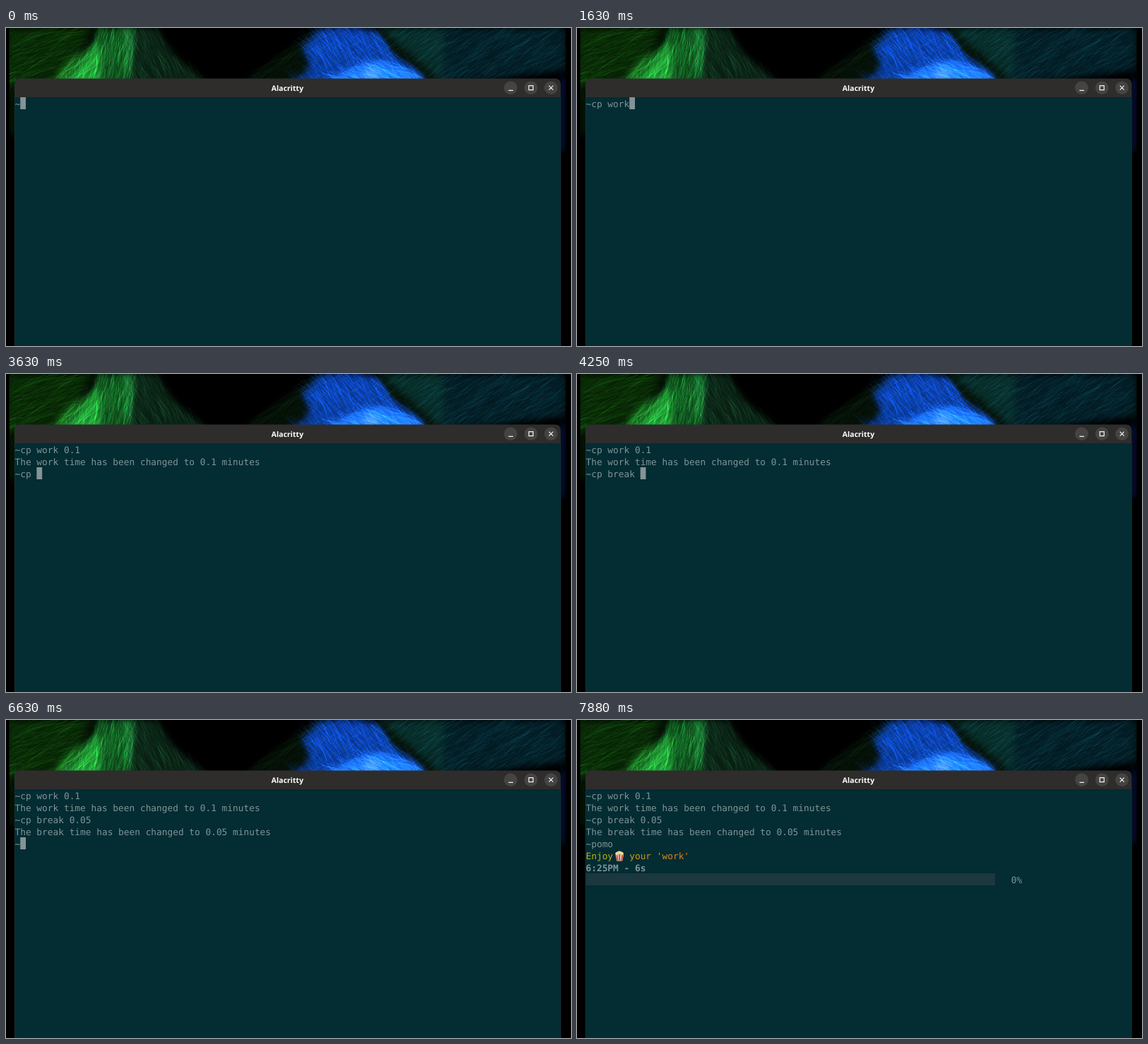
An HTML page with a canvas for the animation above (8 s loop, 800 by 450 pixels).

```html
<!DOCTYPE html>
<html lang="en">
<head>
<meta charset="utf-8">
<title>Terminal</title>
<style>
  html, body { margin: 0; width: 100%; height: 100%; overflow: hidden; background: #000; }
  canvas, svg { position: absolute; left: 0; top: 0; }
  text { white-space: pre; text-rendering: geometricPrecision; }
  .mono { font: 12.82px "DejaVu Sans Mono", monospace; fill: #7f9496; }
  .bold { font-weight: bold; }
  .title { font: bold 10.5px "Open Sans", sans-serif; fill: #fff; text-anchor: middle; }
  .icon { fill: none; stroke: #f4f4f4; stroke-width: 1.2; }
</style>
</head>
<body>
<canvas id="wallpaper" width="800" height="450"></canvas>
<svg width="800" height="450" viewBox="0 0 800 450">
  <defs>
    <linearGradient id="warm" gradientUnits="userSpaceOnUse" x1="12" x2="160" y1="0" y2="0">
      <stop offset="0" stop-color="#b3b80c"/>
      <stop offset="1" stop-color="#dc7a1c"/>
    </linearGradient>
  </defs>
  <path d="M12 98V80q0-8.500 8.500-8.500H777q8.500 0 8.500 8.500V98z" fill="#2e2d2c"/>
  <path d="M12 98H785.500V450H12z" fill="#032c33"/>
  <path d="M12.200 98V450M785.300 98V450" stroke="#28373a" stroke-width=".6"/>
  <text class="title" x="398.500" y="89">Alacritty</text>
  <g fill="#454443">
    <circle cx="714.500" cy="84.700" r="9.400"/>
    <circle cx="743.300" cy="84.700" r="9.400"/>
    <circle cx="771.700" cy="84.700" r="9.400"/>
  </g>
  <path class="icon" d="M711.500 88.300h6.500M740.300 81.700h6v6h-6zM768.700 81.700l6 6m0-6l-6 6"/>

  <g id="screen"></g>
  <rect id="cursor" width="7.800" height="17" fill="#839496"/>

  <g id="session" class="mono">
    <text x="12.500" y="196.500" fill="url(#warm)">Enjoy   your 'work'</text>
    <path d="M54.500 190.500h11.500l-1.800 9h-7.900z" fill="#e9c9b8"/>
    <path d="M56.500 191l1 8M60.200 191v8M64.200 191l-1 8" stroke="#d8402f" stroke-width="1.800"/>
    <path d="M56.500 189l3.500-1.500 3.700 1.500" fill="none" stroke="#f0d79a" stroke-width="4.500" stroke-linecap="round" stroke-linejoin="round"/>
    <text class="bold" x="12.500" y="213.500">6:25PM - 6s</text>
    <rect x="12.500" y="217" width="579.500" height="17" fill="#1b383e"/>
    <text x="614.700" y="230.500">0%</text>
  </g>
</svg>
<script>
const LOOP = 8000, KEY = 125, OUTPUT_AT = 7875;
const LEFT = 12.5, TOP = 98, CELL = 7.718, ROW = 17;
const $ = id => document.getElementById(id);

const reply = (name, minutes) => `The ${name} time has been changed to ${minutes} minutes\n~`;

// Each burst types its text from `at`, one character every `pace` ms (0: all at once).
const bursts = [
  { at: 0, text: '~', pace: 0 },
  { at: 875, text: 'cp work ' },
  { at: 2125, text: '0.1\n' },
  { at: 2625, text: reply('work', 0.1), pace: 0 },
  { at: 3375, text: 'cp ' },
  { at: 3875, text: 'break ', pace: 75 },
  { at: 5000, text: '0.05' },
  { at: 5625, text: '\n' },
  { at: 5750, text: reply('break', 0.05), pace: 0 },
  { at: 7000, text: 'p' },
  { at: 7250, text: 'omo\n' }
];

function typed({ at, text, pace = KEY }, t) {
  if (t < at) return '';
  return pace ? text.slice(0, Math.floor((t - at) / pace) + 1) : text;
}

const rows = Array.from({ length: 6 }, (_, i) => {
  const row = document.createElementNS('http://www.w3.org/2000/svg', 'text');
  row.setAttribute('class', 'mono');
  row.setAttribute('x', LEFT);
  row.setAttribute('y', TOP + ROW * i + 13.5);
  return $('screen').appendChild(row);
});

function paintWallpaper() {
  const ctx = $('wallpaper').getContext('2d');
  let seed = 7;
  const random = () => (seed = seed * 16807 % 2147483647) / 2147483647;

  // A soft sheet of light with fine fibres running along `angle`.
  function sheet(color, angle, outline) {
    const path = new Path2D(outline);
    ctx.fillStyle = ctx.strokeStyle = color;
    ctx.filter = 'blur(4px)';
    ctx.globalAlpha = .8;
    ctx.fill(path);
    ctx.filter = 'none';
    ctx.lineWidth = .6;
    for (let i = 0; i < 3000; i++) {
      const x = random() * 800, y = random() * 80;
      if (!ctx.isPointInPath(path, x, y)) continue;
      const a = angle + (random() - .5) * .5, reach = 8 + random() * 18;
      const dx = Math.cos(a) * reach, dy = Math.sin(a) * reach;
      ctx.globalAlpha = random() * .6;
      ctx.beginPath();
      ctx.moveTo(x - dx, y - dy);
      ctx.quadraticCurveTo(x + dy * .2, y - dx * .2, x + dx, y + dy);
      ctx.stroke();
    }
  }

  ctx.beginPath();
  ctx.rect(4.5, 0, 788, 177);
  ctx.clip();
  ctx.globalCompositeOperation = 'lighter';

  sheet('rgb(8,42,6)', -.4, 'M0 0H125L75 80H0z');
  sheet('rgb(10,38,22)', 1.1, 'M165 0H215Q235 45 290 80H175z');
  sheet('rgb(16,85,30)', 1.8, 'M130 0H182L175 80H72Q115 55 130 0z');
  sheet('rgb(18,80,25)', 2.3, 'M68 80Q75 45 132 20L135 80z');
  sheet('rgb(4,16,6)', -.6, 'M330 80L440 0H620V80z');
  sheet('rgb(3,32,40)', -.6, 'M530 0H793V60L620 80z');
  sheet('rgb(6,48,165)', .9, 'M440 5Q490-8 530 10L545 35L592 68V80H390Q450 60 418 32z');
  sheet('rgb(22,65,120)', .4, 'M450 80Q480 55 535 45L588 68V80z');
  sheet('rgb(60,50,30)', .4, 'M500 72L518 56L532 72z');
  sheet('rgb(6,32,6)', 1.5, 'M4 72H13V150H4z');
  sheet('rgb(4,18,65)', 1.5, 'M784 72H793V175H784z');
}

function draw(now) {
  const t = now % LOOP;
  const done = t >= OUTPUT_AT;
  const lines = bursts.map(burst => typed(burst, t)).join('').split('\n');
  rows.forEach((row, i) => {
    row.textContent = lines[i] || '';
  });
  const last = lines.length - 1;
  $('cursor').setAttribute('x', LEFT + CELL * lines[last].length);
  $('cursor').setAttribute('y', TOP + ROW * last);
  $('cursor').style.display = done ? 'none' : '';
  $('session').style.display = done ? '' : 'none';
}

paintWallpaper();
const start = performance.now();
(function tick() {
  draw(performance.now() - start);
  requestAnimationFrame(tick);
})();
</script>
</body>
</html>
```
